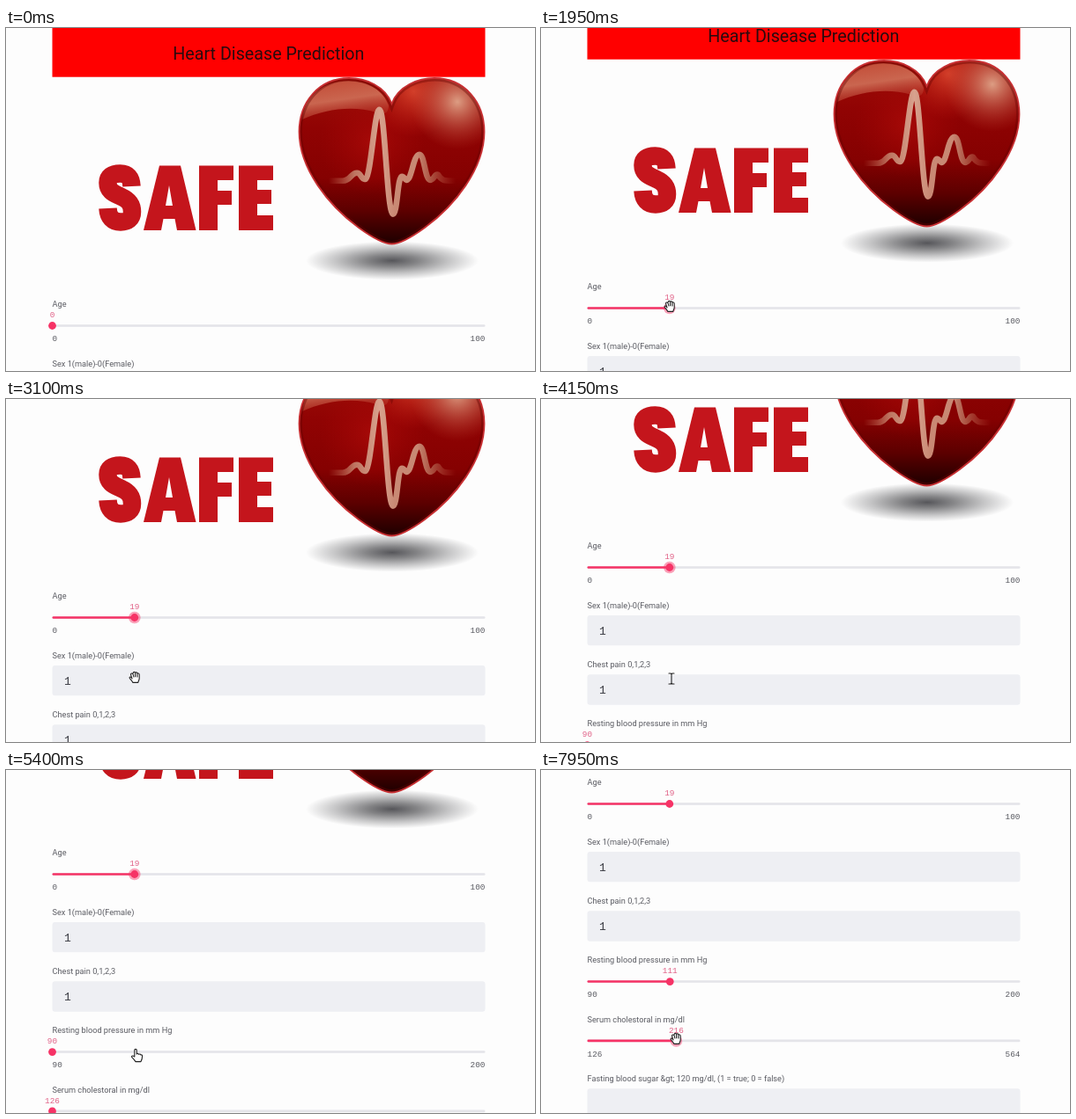
Recreate the animation shown at these times as an HTML page with a canvas. Size 600 by 390 pixels, loop 8000 ms.

```html
<!DOCTYPE html>
<html lang="en">
<head>
<meta charset="utf-8">
<title>Heart Disease Prediction</title>
<style>
html, body { margin: 0; width: 100%; height: 100%; overflow: hidden; background: #fdfdfd; }
canvas { display: block; }
</style>
</head>
<body>
<canvas id="stage" width="600" height="390"></canvas>
<script>
const ctx = document.getElementById('stage').getContext('2d');
const LOOP = 8000, STEP = 50;
const LEFT = 52.5, WIDTH = 491, RIGHT = LEFT + WIDTH;
const FIRST_ROW = 314, ROW = 67.35;
const SANS = 'Roboto, sans-serif', MONO = '"Liberation Mono", monospace';
const PINK = '#f63366', INK = '#5a5b62';

// Key points: [time, value...], linear in between.
const scrollKeys = [[900, 0], [1650, 20], [2050, 20], [3100, 90], [4150, 147], [5100, 220], [6050, 220], [6750, 300]];
const cursorKeys = [[850, 146, 400], [1500, 146, 317], [3200, 146, 317], [3700, 148, 318], [4300, 148, 318],
  [5300, 147, 317], [5700, 147, 317], [6500, 147, 317], [6800, 150, 312], [7250, 150, 307], [7650, 150, 306], [7950, 153, 306]];
const cursorIcons = [[0, 'arrow'], [1650, 'pointer'], [1850, 'grab'], [3300, 'beam'], [4700, 'pointer'],
  [5700, 'grab'], [6600, 'arrow'], [7100, 'pointer'], [7300, 'grab']];
const focusKeys = [[0, ''], [1850, 'Age'], [5700, 'Rest'], [7300, 'Serum']];

function track(keys, t) {
  if (t <= keys[0][0]) return keys[0].slice(1);
  for (let i = 1; i < keys.length; i++) {
    const a = keys[i - 1], b = keys[i];
    if (t <= b[0]) {
      const k = (t - a[0]) / (b[0] - a[0]);
      return a.slice(1).map((v, j) => v + (b[j + 1] - v) * k);
    }
  }
  return keys[keys.length - 1].slice(1);
}

const current = (keys, t) => keys.filter(k => k[0] <= t).pop()[1];

function text(str, x, y, font, color = INK, align = 'left') {
  ctx.font = font;
  ctx.fillStyle = color;
  ctx.textAlign = align;
  ctx.fillText(str, x, y);
}

function disc(x, y, r, color) {
  ctx.fillStyle = color;
  ctx.beginPath();
  ctx.arc(x, y, r, 0, 7);
  ctx.fill();
}

function bar(x, y, w, h, r, color) {
  ctx.fillStyle = color;
  ctx.beginPath();
  ctx.roundRect(x, y, w, h, r);
  ctx.fill();
}

function gradient(g, ...stops) {
  stops.forEach(([at, color]) => g.addColorStop(at, color));
  return g;
}

const heart = new Path2D(`M437.5 86 C430 66 408 57 389 57 C355 57 332.5 84 332.5 118
  C332.5 160 366 202 400 227 C415 238 428 245.5 437.5 245.5 C447 245.5 460 238 475 227
  C509 202 542.5 160 542.5 118 C542.5 84 520 57 486 57 C467 57 445 66 437.5 86Z`);
const gloss = new Path2D(`M336 104 C338 77 361 60 388 60 C411 60 428 71 434 88
  C434 98 428 99 420 96 C394 88 362 92 336 104Z`);
const pulse = new Path2D(`M367 173 H382 C391 173 391 164 398 164 C403 164 403 173 408 171
  C414 166 418 92 423.5 92 C430 92 432 211 439 211 C444 211 444 168 449 168
  C453 168 453 176 457 170 C461 163 463 143 469 143 C475 143 475 174 482 172
  C486 171 486 165 490 166 C494 173 497 173 508 173`);
const curveS = new Path2D(`M142.5 180 C142 170 138 165.5 129.5 165.5 C120 165.5 115.5 169 115.5 176
  C115.5 186 123 188 131 192 C140 196 143 201 143 209 C143 217 138 220.5 130 220.5
  C121 220.5 116 215 115.5 205`);
const blockLetters = new Path2D(`M156 230 L174 156.5 H198 L215.5 230 H194 L191.5 217 H178.5 L176 230Z
  M181 202 H189 L185 179Z
  M219 156.5 H258 V173 H240 V185 H256 V201 H240 V230 H219Z
  M264 156.5 H303 V173 H285 V184 H301 V200 H285 V213 H303 V230 H264Z`);

function drawBanner() {
  ctx.fillStyle = '#f00';
  ctx.fillRect(LEFT, 0, WIDTH, 55.7);
  text('Heart Disease Prediction', 297.8, 36, '19.7px ' + SANS, '#2a0a0e', 'center');

  ctx.fillStyle = ctx.strokeStyle = '#c4151c';
  ctx.lineWidth = 20.5;
  ctx.lineCap = 'butt';
  ctx.stroke(curveS);
  ctx.fill(blockLetters, 'evenodd');
}

function drawHeart() {
  ctx.save();
  ctx.translate(438, 264.5);
  ctx.scale(1, 0.225);
  disc(0, 0, 98, gradient(ctx.createRadialGradient(0, 0, 0, 0, 0, 98),
    [0, '#56565a'], [0.3, '#858587'], [0.65, '#c4c4c5'], [1, '#fdfdfd']));
  ctx.restore();

  ctx.fillStyle = gradient(ctx.createLinearGradient(0, 57, 0, 246),
    [0, '#a01008'], [0.3, '#900303'], [0.6, '#850101'], [0.8, '#5c0000'], [1, '#1c0000']);
  ctx.fill(heart);

  ctx.save();
  ctx.clip(heart);
  const glows = [
    [415, 130, 60, 'rgba(185,15,12,.55)', 'rgba(170,5,5,0)'],
    [462, 72, 52, 'rgba(225,75,50,.8)', 'rgba(200,30,20,0)'],
    [512, 84, 54, 'rgba(224,165,138,.95)', 'rgba(195,70,50,0)']
  ];
  for (const [x, y, r, inner, outer] of glows)
    disc(x, y, r, gradient(ctx.createRadialGradient(x, y, 0, x, y, r), [0, inner], [1, outer]));

  ctx.fillStyle = gradient(ctx.createLinearGradient(380, 60, 386, 102),
    [0, 'rgba(205,95,70,.8)'], [0.5, 'rgba(214,125,98,.8)'], [1, 'rgba(185,60,45,.45)']);
  ctx.fill(gloss);

  // Dark inner edge below the bright rim.
  ctx.strokeStyle = 'rgba(100,0,0,.4)';
  ctx.lineWidth = 7;
  ctx.stroke(heart);
  ctx.restore();
  ctx.strokeStyle = '#c83033';
  ctx.lineWidth = 1.8;
  ctx.stroke(heart);

  ctx.save();
  ctx.translate(0, 0.7);
  ctx.strokeStyle = gradient(ctx.createLinearGradient(366, 0, 510, 0),
    [0, 'rgba(190,90,70,0)'], [0.2, '#bd7460'], [0.4, '#d8a28e'], [0.52, '#c98974'],
    [0.7, '#c88873'], [0.82, '#a84c3c'], [1, 'rgba(170,50,40,0)']);
  ctx.lineWidth = 6.6;
  ctx.lineCap = ctx.lineJoin = 'round';
  ctx.stroke(pulse);
  ctx.restore();
}

const label = (str, row) => text(str, LEFT, FIRST_ROW + row * ROW + 3.2, '9.2px ' + SANS);

function drawSlider(title, row, min, max, value, focused) {
  const y = FIRST_ROW + row * ROW, lineY = y + 24.5;
  const x = LEFT + WIDTH * (value - min) / (max - min);
  const font = '9.4px ' + MONO;
  label(title, row);
  bar(LEFT, lineY - 1.3, WIDTH, 2.6, 1.3, '#e4e4e9');
  bar(LEFT, lineY - 1.3, x - LEFT, 2.6, 1.3, PINK);
  if (focused) disc(x, lineY, 6.8, 'rgba(246,51,102,.45)');
  disc(x, lineY, 4.4, PINK);
  text(value, x, y + 15.2, font, '#e06086', 'center');
  text(min, LEFT, y + 42.3, font);
  text(max, RIGHT, y + 42.3, font, INK, 'right');
}

function drawInput(title, row, value) {
  const y = FIRST_ROW + row * ROW;
  label(title, row);
  bar(LEFT, y + 11.6, WIDTH, 34.4, 3, '#eeeff3');
  text(value, 66, y + 33.3, '13px ' + MONO, '#3a3b42');
}

// Each shape is drawn around its own hot spot.
const icons = {
  arrow: new Path2D('M0 0 V12 L2.8 9.4 L4.7 13.4 L6.6 12.5 L4.8 8.7 H8.4Z'),
  pointer: new Path2D(`M-1.2 9 V1.6 C-1.2 0 1.2 0 1.2 1.6 V6 C2 5 3.5 5.4 3.6 6.4
    C4.4 5.6 5.7 6 5.8 7 C6.8 6.5 7.6 7.2 7.6 8.2 C7.6 11 7 12.6 6 14.6 H0
    C-1.5 12.4 -3 10.8 -4.4 9.4 C-4.8 8 -3 7.4 -1.2 9Z`),
  grab: new Path2D(`M-3 1 L-4.4 -3.4 C-4.8 -5 -2.8 -5.6 -2.2 -4.2 L-1.8 -5.4
    C-1.6 -7 .4 -7 .6 -5.4 C1 -6.6 2.8 -6.4 2.9 -4.8 C3.4 -5.6 5.2 -5.2 5.2 -3.6
    V.4 C5.2 2.4 4.2 3.4 3.8 5.4 H-2.2 C-2.6 3.8 -5 2 -5.8 .2 C-6.2 -1.4 -4.4 -1.6 -3 1Z
    M-1.8 -4 L-1.2 -1 M.6 -5 V-1.2 M2.9 -4.4 V-1`),
  beam: new Path2D('M-3 -6 H-1 L0 -5.2 L1 -6 H3 M0 -5.2 V5.2 M-3 6 H-1 L0 5.2 L1 6 H3')
};

function drawCursor(t) {
  if (t < 850) return;
  const [x, y] = track(cursorKeys, t), name = current(cursorIcons, t);
  ctx.save();
  ctx.translate(x, y);
  ctx.lineWidth = 1.1;
  ctx.lineCap = ctx.lineJoin = 'round';
  ctx.strokeStyle = '#222';
  ctx.fillStyle = '#fff';
  if (name !== 'beam') ctx.fill(icons[name]);
  ctx.stroke(icons[name]);
  ctx.restore();
}

function draw(t) {
  const focus = current(focusKeys, t);
  const cholesterol = t < 7300 ? 126 : Math.round(track([[7650, 213], [7950, 216]], t)[0]);
  ctx.fillStyle = '#fdfdfd';
  ctx.fillRect(0, 0, 600, 390);
  ctx.save();
  ctx.translate(0, -Math.round(track(scrollKeys, t)[0]));
  drawBanner();
  drawHeart();
  drawSlider('Age', 0, 0, 100, t < 1850 ? 0 : 19, focus === 'Age');
  drawInput('Sex 1(male)-0(Female)', 1, '1');
  drawInput('Chest pain 0,1,2,3', 2, '1');
  drawSlider('Resting blood pressure in mm Hg', 3, 90, 200, t < 5700 ? 90 : 111, focus === 'Rest');
  drawSlider('Serum cholestoral in mg/dl', 4, 126, 564, cholesterol, focus === 'Serum');
  drawInput('Fasting blood sugar &gt; 120 mg/dl, (1 = true; 0 = false)', 5, '');
  ctx.restore();
  drawCursor(t);
}

function tick() {
  draw(Math.floor(performance.now() % LOOP / STEP) * STEP);
  requestAnimationFrame(tick);
}
tick();
</script>
</body>
</html>
```
